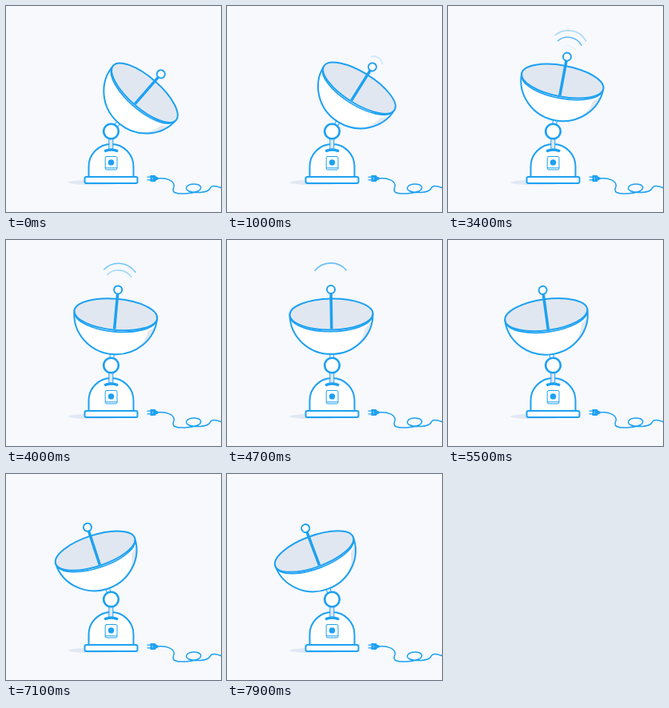
Recreate the animation shown at these times as an HTML page. Size 269 px wide and 258 px high, loop 8 s.

```html
<!DOCTYPE html>
<html lang="en">
<head>
<meta charset="utf-8">
<title>Turning dish</title>
<style>
  html, body { margin: 0; width: 100%; height: 100%; overflow: hidden; background: #f7f9fd; }
  svg { display: block; width: 269px; height: 258px; }
  .line { fill: none; stroke: #1da1f2; stroke-width: 2; stroke-linecap: round; stroke-linejoin: round; }
  .thin { stroke-width: 1; }
  .white { fill: #fff; }
  .grey { fill: #e1e7f0; }
  .blue { fill: #1da1f2; }
</style>
</head>
<body>
<svg viewBox="0 0 269 258">
  <ellipse cx="112" cy="221" rx="34" ry="3.2" fill="#e1e8f4"/>

  <g id="cable">
    <path class="line" stroke-width="1.5" style="stroke-width:1.5" d="M190 216C202 215 210 219 210.3 225C210 228 207 231 211 233.5C218 237 236 234 241 231.5C246 228 244 223 235 223C226 223 223 229 228 231.5C235 235 252 234 255 229C257 224 262 225 270 228"/>
    <path class="line" style="stroke-width:1.3" d="M177 214.2H181M177 217.8H181"/>
    <path class="blue" d="M180.5 212H186Q187.5 212 187.5 213.5L190.5 214.8V217.2L187.5 218.5Q187.5 220 186 220H180.5Z"/>
    <path d="M183.3 214.5V217.5" stroke="#8fd0f8"/>
  </g>

  <g id="base">
    <path class="line white" d="M103.5 214V201A28 28 0 0 1 159.5 201V214Z"/>
    <rect class="line white" x="98.5" y="214" width="66" height="8" rx="2"/>
    <rect class="line thin white" x="124.2" y="188.5" width="14.8" height="16.5" rx="1.8"/>
    <path class="line thin" d="M124.5 202.8H138.7"/>
    <circle class="blue" cx="131.5" cy="195.9" r="3.7"/>
    <rect class="line thin grey" x="129.2" y="166" width="4.6" height="14"/>
    <path class="line" style="stroke-width:3.4" d="M124.5 181.4Q131.5 178.6 138.8 181.4"/>
  </g>

  <!-- Dish is drawn upright around the joint -->
  <g id="dish">
    <rect class="line thin white" x="-2.4" y="-16" width="4.8" height="10"/>
    <path class="white" d="M-52 -64A52 50 0 0 0 52 -64Z"/>
    <path class="grey" d="M42 -46C40 -34 34 -25 19 -17.5C36 -23 49 -36 51 -54Z"/>
    <path class="line" d="M-52 -64A52 50 0 0 0 52 -64"/>
    <path class="line" style="stroke-width:1.7" d="M-51.5 -60A52 20.5 0 0 0 51.5 -60"/>
    <ellipse class="line grey" cx="0" cy="-64" rx="52" ry="19.5"/>
    <path class="line" style="stroke-width:3.5;stroke-linecap:butt" d="M0 -90V-45.5"/>
    <circle class="line white" cx="0" cy="-95" r="5"/>
  </g>

  <circle class="line white" style="stroke-width:2.6" cx="131.5" cy="157" r="9.3"/>
</svg>
<script>
  const LOOP = 8000, STEP = 100;
  const dish = document.getElementById('dish');

  // [time, lean in degrees]
  const lean = [[0, 41], [1000, 32], [2300, 20.5], [3400, 10.6], [4700, -0.9], [6400, -14.6], [7900, -20.5]];
  // [time since a wave starts, opacity]
  const glow = [[0, 0], [300, .2], [650, .34], [1600, .72], [2000, .64], [2750, 0]];

  // [start time, centre height, radius]
  const waves = [[700, 98, 11], [1700, 100, 19.6], [2700, 102.5, 25.6]].map(([start, h, r]) => {
    const el = document.createElementNS('http://www.w3.org/2000/svg', 'path');
    const a = 50 * Math.PI / 180, x = r * Math.sin(a), y = -h - r * Math.cos(a);
    el.setAttribute('class', 'line');
    el.style.strokeWidth = 1.6;
    el.setAttribute('d', `M${-x} ${y}A${r} ${r} 0 0 1 ${x} ${y}`);
    dish.append(el);
    return { el, start };
  });

  function linear(table, t) {
    if (t <= table[0][0]) return table[0][1];
    const i = table.findIndex(p => p[0] > t);
    if (i < 0) return table[table.length - 1][1];
    const [t0, v0] = table[i - 1], [t1, v1] = table[i];
    return v0 + (v1 - v0) * (t - t0) / (t1 - t0);
  }

  function slope(table, i) {
    const a = table[Math.max(i - 1, 0)], b = table[Math.min(i + 1, table.length - 1)];
    return i === table.length - 1 ? -.002 : (b[1] - a[1]) / (b[0] - a[0]);
  }

  function smooth(table, t) {
    let i = table.findIndex(p => p[0] > t);
    if (i < 0) i = table.length - 1;
    const [t0, v0] = table[i - 1], [t1, v1] = table[i];
    const d = t1 - t0, u = (t - t0) / d, w = 1 - u;
    return v0 * (1 + 2 * u) * w * w + v1 * u * u * (3 - 2 * u)
      + d * u * w * (slope(table, i - 1) * w - slope(table, i) * u);
  }

  function draw(now) {
    const t = Math.floor(now % LOOP / STEP) * STEP;
    dish.setAttribute('transform', `translate(131.5 157) rotate(${smooth(lean, t)})`);
    for (const { el, start } of waves) el.style.opacity = linear(glow, t - start);
  }

  const begin = performance.now();
  function tick() {
    draw(performance.now() - begin);
    requestAnimationFrame(tick);
  }
  tick();
</script>
</body>
</html>
```
